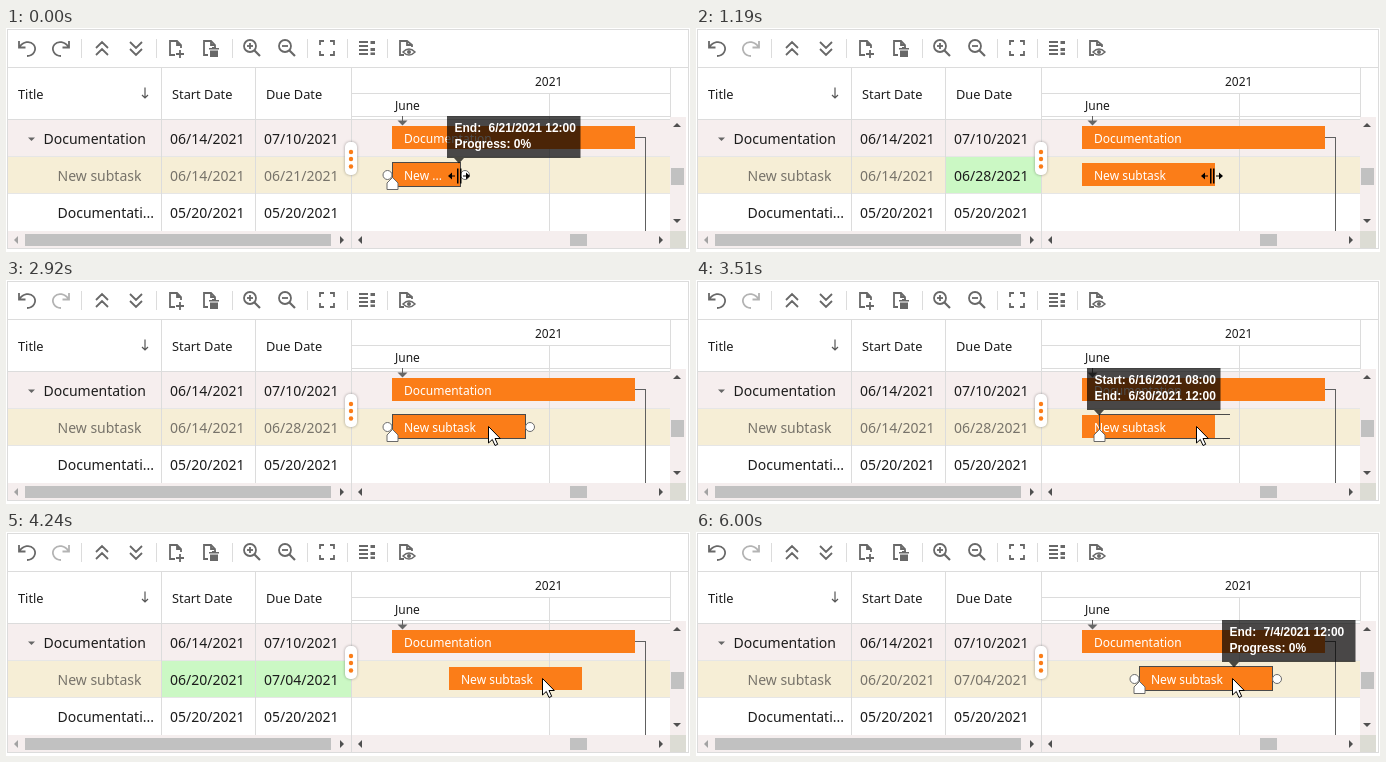
An HTML page for the animation above (9.83 s loop, 684 by 224 pixels).

```html
<!DOCTYPE html>
<html lang="en">
<head>
<meta charset="utf-8">
<title>Gantt chart</title>
<style>
  html, body { margin: 0; width: 100%; height: 100%; overflow: hidden; background: #fff; }
  svg { display: block; font: 12px "Noto Sans", "Open Sans", sans-serif; fill: #1c1c1c; }
  .crisp { shape-rendering: crispEdges; }
  .cells { font-size: 14px; }
  .heads { font-size: 12.8px; }
  .muted { fill: #77736a; }
  .rule { stroke: #dcdcdc; fill: none; }
  .icons { stroke: #686868; stroke-width: 1.8; fill: none; }
  .icons .solid { fill: #686868; stroke: none; }
  .bar { fill: #fb7d18; }
  .label { fill: #fff; }
  .outline { fill: none; stroke: #4a4a4a; }
  .knob { fill: #fff; stroke: #6a6a6a; }
  .track { fill: #f5eeee; }
  .thumb { fill: #c1c1c1; }
  .tip { font: bold 12px "Liberation Sans", Arial, sans-serif; fill: #fff; }
  .tip path { fill: #000; fill-opacity: .7; }
  .grip { filter: drop-shadow(0 0 1.5px rgba(0, 0, 0, .35)); }
  .panel { filter: drop-shadow(0 1px 4px rgba(0, 0, 0, .35)); }
</style>
</head>
<body>
<svg width="684" height="224" viewBox="0 0 684 224">
  <!-- rows -->
  <g class="crisp">
    <rect x="2" y="92" width="662" height="36" fill="#f6eeee"/>
    <rect x="2" y="129" width="662" height="36" fill="#f6eed6"/>
    <rect id="startCell" x="156" y="129" width="93" height="36" fill="#cbf8c4"/>
    <rect id="dueCell" x="250" y="129" width="95" height="36" fill="#cbf8c4"/>
    <path class="rule" d="M1.5 1.5H682.5V220.5H1.5ZM2 39.5H682M2 91.5H345M346 65.5H664M346 88.5H664M346 91.5H664M155.5 40V203M249.5 40V203M543.5 66V203M664.5 40V203"/>
    <path class="rule" stroke-opacity=".7" d="M2 128.5H664M2 165.5H664"/>
    <path class="rule" d="M345.5 40V220"/>
    <path class="rule" d="M75.5 11V30M150.5 11V30M226.5 11V30M301.5 11V30M341.5 11V30M381.5 11V30"/>
  </g>

  <!-- scrollbars -->
  <g class="crisp">
    <path class="track" d="M664 89H680V203H664ZM2 203H345V220H2ZM346 203H664V220H346Z"/>
    <rect x="664" y="203" width="16" height="17" fill="#dcdcd4"/>
    <path class="thumb" d="M665 140H678V157H665ZM19 206H325V218H19ZM564 206H581V218H564Z"/>
  </g>
  <path fill="#a3a3a3" d="M12 208V216L8 212Z"/>
  <path fill="#505050" d="M667 99L671 95L675 99ZM667 191H675L671 195ZM334 208V216L338 212ZM356 208V216L352 212ZM653 208V216L657 212Z"/>

  <!-- toolbar -->
  <g class="icons">
    <path d="M13 13V19.500H19.500M13.500 19C17 13.500 24 12.500 27.500 16.500C31.500 21.500 27.500 28 21 28"/>
    <path id="redo" d="M63 13V19.500H56.500M62.500 19C59 13.500 52 12.500 48.500 16.500C44.500 21.500 48.500 28 55 28"/>
    <path d="M90 20L96 14L102 20M90 27L96 21L102 27M124 14L130 20L136 14M124 21L130 27L136 21"/>
    <path d="M169 27H164V13H171L175 17V20M171 13V17H175M174 22V30M170 26H178"/>
    <path d="M202 27H198V13H205L209 17V19M205 13V17H209"/>
    <path class="solid" d="M203 20H206V19H210V20H213V21.500H203ZM204 22.500H212V29H204Z"/>
    <g id="lens"><circle cx="244" cy="18" r="6"/><path stroke-width="2.200" d="M248.500 22.500L254 28"/><path d="M241 18H247"/></g>
    <path d="M244 15V21"/>
    <use href="#lens" x="35"/>
    <path d="M314 17V13H318M324 13H328V17M328 23V27H324M318 27H314V23"/>
    <path d="M353 14H362M353 18H362M353 22H362M353 26H362"/>
    <path class="solid" d="M364.500 13H369V16H364.500ZM364.500 20H369V23H364.500ZM364.500 24.500H369V27H364.500Z"/>
    <path d="M398 27H394V13H401L406 17V19M401 13V17H406"/>
    <path stroke-width="1.500" d="M397 24Q403 18 409 24Q403 30 397 24Z"/>
    <circle class="solid" cx="403" cy="24" r="2"/>
  </g>

  <!-- grid -->
  <g class="heads">
    <text x="12" y="71">Title</text>
    <text x="166" y="71">Start Date</text>
    <text x="260" y="71">Due Date</text>
  </g>
  <path d="M139 59.500V70M136 67L139 70L142 67" fill="none" stroke="#555" stroke-width="1.200"/>
  <path d="M22 109.500H29L25.500 113Z" fill="#666"/>
  <g class="cells">
    <text x="37.500" y="116">Documentation</text>
    <text x="164" y="116">06/14/2021</text>
    <text x="258" y="116">07/10/2021</text>
    <text class="muted" x="51.500" y="153">New subtask</text>
    <text id="startText" x="164" y="153"></text>
    <text id="dueText" x="258" y="153"></text>
    <text x="51.500" y="190">Documentati...</text>
    <text x="164" y="190">05/20/2021</text>
    <text x="258" y="190">05/20/2021</text>
  </g>

  <!-- chart -->
  <text x="529" y="58">2021</text>
  <text x="389" y="82">June</text>
  <path class="crisp" d="M396.500 88V93M629 109.500H639.500V203" fill="none" stroke="#606060"/>
  <path d="M391.500 92.500H401.500L396.500 97.500Z" fill="#666"/>
  <rect class="bar" x="386" y="98" width="243" height="23"/>
  <text class="label" x="398" y="115">Documentation</text>
  <rect id="bar" class="bar" y="135" height="23"/>
  <text id="barText" class="label" y="152"></text>
  <path id="outline" class="outline crisp"/>
  <g id="knobs" class="knob">
    <circle id="leftKnob" cy="147" r="4.500"/>
    <circle id="rightKnob" cy="147" r="4.500"/>
  </g>
  <path id="slider" class="knob" d="M0 149.500L5.500 155V161.500H-5.500V155Z"/>

  <!-- splitter grip -->
  <rect class="grip" x="339" y="114" width="12" height="33" rx="5" fill="#fff"/>
  <g class="bar">
    <circle cx="345" cy="124" r="2.200"/><circle cx="345" cy="131" r="2.200"/><circle cx="345" cy="138.500" r="2.200"/>
  </g>

  <g id="tip" class="tip">
    <path d="M-12 88H121.500V130H5L0 135.500L-5 130H-12Z"/>
    <text id="label1" x="-4.500" y="104"></text><text id="value1" x="29.500" y="104"></text>
    <text id="label2" x="-4.500" y="120"></text><text id="value2" x="29.500" y="120"></text>
  </g>

  <g id="loading">
    <rect class="panel" x="272" y="85" width="139" height="53" fill="#fff"/>
    <g fill="none" stroke-width="4">
      <circle cx="302" cy="111" r="14" stroke="#ececec"/>
      <circle id="spinner" cx="302" cy="111" r="14" stroke="#f8843a" pathLength="100" stroke-dasharray="74 26"/>
    </g>
    <text x="326" y="118" font-size="15.200" fill="#767676">Loading...</text>
  </g>

  <path id="arrow" d="M0 0V16.500L3.800 13L6.500 19L9.200 17.800L6.500 12H11.800Z" fill="#fff" stroke="#000"/>
  <g id="resize" fill="#000">
    <path d="M-2 -7.500H-.5V7.500H-2ZM1 -7.500H2.500V7.500H1Z"/>
    <path d="M-11 0L-7 -3.500V-.5H-4V.5H-7V3.500ZM11 0L7 -3.500V-.5H4V.5H7V3.500Z"/>
  </g>
</svg>
<script>
  const LOOP = 9830, DAY = 9.47, LEFT = 386, MOVED = 443, LENGTH = 133;
  const TOP = 134.5, BOTTOM = 158.5;
  const $ = id => document.getElementById(id);
  const show = (id, on) => $(id).setAttribute('visibility', on ? 'visible' : 'hidden');
  const set = (id, attrs) => { for (const k in attrs) $(id).setAttribute(k, attrs[k]); };
  const move = (id, x, y = 0) => set(id, { transform: `translate(${x} ${y})` });
  const within = (t, from, to) => t >= from && t < to;

  // Linear path through [time, value, value...] stops.
  function along(t, stops) {
    if (t <= stops[0][0]) return stops[0].slice(1);
    for (let i = 1; i < stops.length; i++) {
      const a = stops[i - 1], b = stops[i];
      if (t < b[0]) {
        const k = (t - a[0]) / (b[0] - a[0]);
        return a.slice(1).map((v, j) => v + (b[j + 1] - v) * k);
      }
    }
    return stops[stops.length - 1].slice(1);
  }

  const stretch = [[490, 454], [850, 482], [1150, 519]];
  const slide = [[3080, 386], [3350, 391], [3630, 412], [3720, 426], [3920, 439], [4050, 443]];
  const pointer = [[490, 453, 141], [650, 480, 143], [850, 504, 148], [1010, 512, 153], [1150, 516, 148],
    [2650, 516, 148], [2890, 483, 146], [3080, 483, 146], [3350, 488, 146], [3630, 510, 146],
    [3720, 526, 145], [3920, 535, 146], [4050, 537, 146]];

  // Dates count days from June 14.
  function date(days) {
    const n = 14 + days;
    return n > 30 ? `7/${n - 30}/2021` : `6/${n}/2021`;
  }

  function tip(x, first, second) {
    show('tip', true);
    move('tip', Math.round(x));
    [first, second].forEach(([label, value = ''], i) => {
      $('label' + (i + 1)).textContent = label;
      $('value' + (i + 1)).textContent = value;
    });
  }

  const start = days => ['Start:', date(days) + ' 08:00'];
  const end = days => ['End:', date(days) + ' 12:00'];
  const progress = ['Progress: 0%'];

  function cell(name, text, edited) {
    show(name + 'Cell', edited);
    const el = $(name + 'Text');
    el.textContent = text;
    el.setAttribute('class', edited ? '' : 'muted');
  }

  const frameBar = (from, to) =>
    set('outline', { d: `M${from + .5} ${TOP}H${to + .5}V${BOTTOM}H${from + .5}Z` });

  function render(t) {
    const stretching = within(t, 490, 1190), sliding = within(t, 3080, 4210);
    const selected = t < 490 || within(t, 2450, 3080) || t >= 5670;
    const long = t >= 1190, moved = t >= 4210;
    const x = moved ? MOVED : LEFT, width = long ? LENGTH : 68;

    cell('start', moved ? '06/20/2021' : '06/14/2021', within(t, 4210, 5670));
    cell('due', moved ? '07/04/2021' : long ? '06/28/2021' : '06/21/2021',
      within(t, 1190, 2450) || within(t, 4210, 5670));
    set('redo', { 'stroke-opacity': long ? .5 : 1 });

    set('bar', { x, width });
    set('barText', { x: x + 12 });
    $('barText').textContent = long ? 'New subtask' : 'New ...';

    show('outline', selected || stretching || sliding);
    show('knobs', selected);
    show('slider', selected || stretching || sliding);
    show('tip', false);

    let left = x;
    if (stretching) {
      const right = Math.round(along(t, stretch)[0]);
      frameBar(x, right - 1);
      tip(right, start(0), end(Math.round((right - LEFT) / DAY - .17)));
    } else if (sliding) {
      left = Math.round(along(t, slide)[0]);
      const days = Math.round((left - LEFT) / DAY);
      set('outline', { d: `M${left + 131} ${TOP}H${left + .5}V${BOTTOM}H${left + 131}` });
      tip(left, start(days), end(days + 14));
    } else {
      frameBar(x, x + width);
      if (t < 490) tip(453, end(7), progress);
      else if (within(t, 2650, 2830)) tip(516, end(14), progress);
      else if (t >= 6000) tip(538, end(20), progress);
    }
    move('slider', left + .5);
    set('leftKnob', { cx: x - 4.5 });
    set('rightKnob', { cx: x + width + 5 });

    const loading = within(t, 2020, 2450) || within(t, 5370, 5670);
    show('loading', loading);
    if (loading) {
      const angle = (t - (t < 5000 ? 2020 : 5370)) * .36 - 75;
      set('spinner', { transform: `rotate(${angle} 302 111)` });
    }

    const [px, py] = along(t, pointer).map(Math.round);
    const resizing = t < 260 || within(t, 1190, 2700);
    show('resize', resizing);
    show('arrow', !resizing);
    move('resize', px, 148);
    move('arrow', px - .5, py + .5);
  }

  function frame() {
    render(performance.now() % LOOP);
    requestAnimationFrame(frame);
  }
  frame();
</script>
</body>
</html>
```
